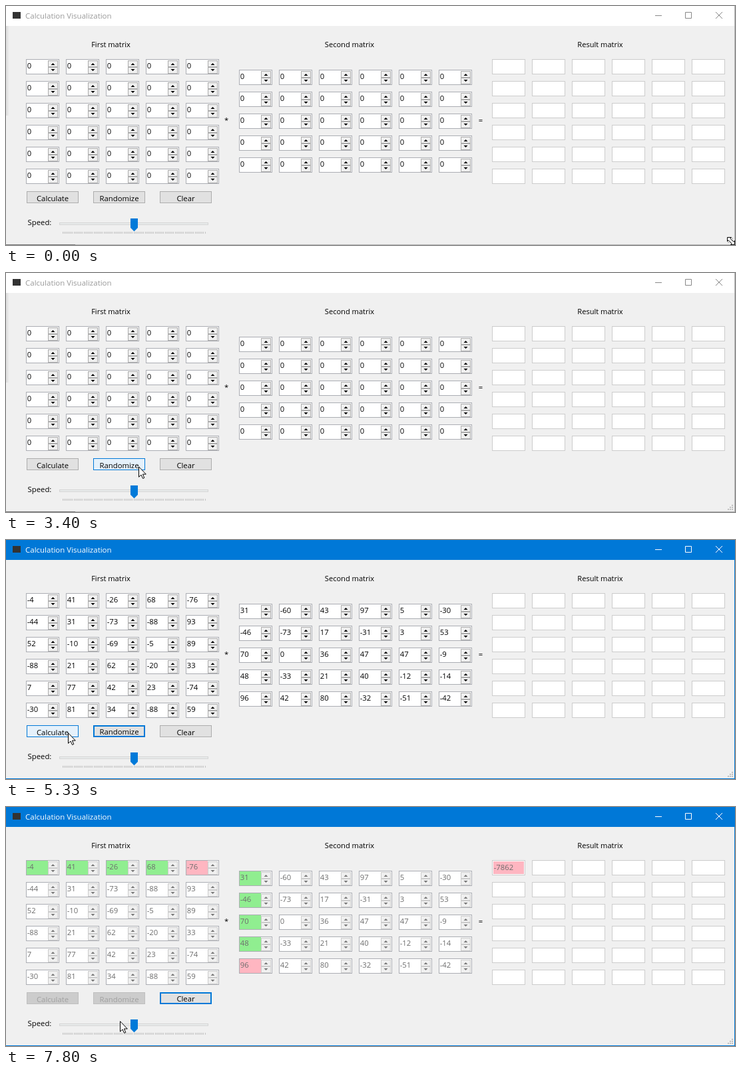
An HTML page that plays this animation: 1095 by 360 pixels, repeating every 8000 ms.

```html
<!DOCTYPE html>
<html lang="en">
<head>
<meta charset="utf-8">
<title>Calculation Visualization</title>
<style>
html, body { margin: 0; width: 100%; height: 100%; overflow: hidden; background: #f0f0f0; }
svg { display: block; width: 1095px; height: 360px; font: 11.3px "Open Sans", "Noto Sans", sans-serif; }
text { white-space: pre; }
rect { shape-rendering: crispEdges; }
</style>
</head>
<body>
<svg id="stage" viewBox="0 0 1095 360">
  <defs>
    <linearGradient id="shade">
      <stop offset="0" stop-color="#000" stop-opacity=".09"/>
      <stop offset="1" stop-color="#000" stop-opacity="0"/>
    </linearGradient>
  </defs>
</svg>
<script>
const FPS = 15, FRAMES = 120;
const PINK = '#ffb6c1', GREEN = '#90ee90', BLUE = '#0078d7';

// Text of the two matrices, one line per row
const parse = str => str.trim().split('\n').map(row => row.trim().split(/\s+/));
const A = parse(`
  -4   41  -26   68  -76
  -44  31  -73  -88   93
  52  -10  -69   -5   89
  -88  21   62  -20   33
  7    77   42   23  -74
  -30  81   34  -88   59`);
const B = parse(`
  31  -60   43   97    5  -30
  -46 -73   17  -31    3   53
  70    0   36   47   47   -9
  48  -33   21   40  -12  -14
  96   42   80  -32  -51  -42`);

// Moments, counted in ticks of 1/15 s
const ACTIVE = 61, FILLED = 62, PRESS = 84, START = 86, LOCKED = 87, STEP = 7.75;

const linear = k => k;
const speedUp = k => k ** 2.4;
const slowDown = k => 1 - (1 - k) ** 1.5;

// Pointer moves: first tick, last tick, destination, easing
const MOVES = [
  [0, 25, 355, 339, speedUp],
  [26, 31, 328, 330, slowDown],
  [34, 47, 267, 312, linear],
  [47, 51, 199, 291, linear],
  [51, 55, 128, 291, linear],
  [55, 60, 165, 293, slowDown],
  [67, 70, 162, 290, slowDown],
  [73, 81, 83, 290, linear],
  [86, 99, 160, 322, slowDown],
  [101, 107, 171, 322, linear]];

function pointer(n) {
  let x = 1089, y = 347;
  for (const [from, to, x1, y1, ease] of MOVES) {
    const k = ease(Math.min(1, Math.max(0, (n - from) / (to - from))));
    x += (x1 - x) * k;
    y += (y1 - y) * k;
  }
  return [Math.round(x), Math.round(y)];
}

const stage = document.getElementById('stage');

function set(el, attrs) {
  for (const k in attrs) el.setAttribute(k, attrs[k]);
}
function add(tag, attrs) {
  const el = document.createElementNS('http://www.w3.org/2000/svg', tag);
  set(el, attrs);
  return stage.appendChild(el);
}
function box(x, y, width, height, fill) {
  return add('rect', { x, y, width, height, fill });
}
function frame(x, y, w, h, fill, stroke) {
  return add('rect', { x: x + .5, y: y + .5, width: w - 1, height: h - 1, fill, stroke });
}
function label(x, y, str, attrs = {}) {
  const el = add('text', { x, y, ...attrs });
  el.textContent = str;
  return el;
}

// Window
const shade = box(0, 30, 5, 135, 'url(#shade)');
const bar = box(0, 0, 1095, 30, '#fff');
box(10, 9, 12, 10, '#333');
const title = label(29, 19, 'Calculation Visualization', { 'font-size': 11.5 });
const caption = add('path', {
  d: 'M975 14.5h10M1020.5 9.5h9v9h-9zM1066 9l10 10M1076 9l-10 10', fill: 'none' });
const edge = add('path', { d: 'M0 359.5H1094.5V0', fill: 'none', 'shape-rendering': 'crispEdges' });
const strip = box(0, 359, 104, 1, '#777');
for (let i = 0; i < 3; i++)
  for (let j = 0; i + j < 3; j++) box(1090 - 3 * i, 355 - 3 * j, 2, 2, '#bfbfbf');

['First', 'Second', 'Result'].forEach((name, i) =>
  label([157.5, 516, 892.5][i], 62, name + ' matrix', { 'font-size': 11.1, 'text-anchor': 'middle' }));
label(328, 176, '*');
label(709.7, 176, '=');

// Number fields
function spinner(x, y) {
  frame(x, y, 50, 23, '#fff', '#abadb3');
  const back = box(x + 1, y + 1, 32, 21, '#fff');
  const keys = [2, 12].map(dy => frame(x + 33, y + dy, 15, 10, '#f0f0f0', '#acacac'));
  const arrows = add('path', {
    d: `M${x + 37.5} ${y + 9}h6l-3 -3zM${x + 37.5} ${y + 15}h6l-3 3z` });
  const text = label(x + 1.7, y + 14, '0');
  return { back, keys, arrows, text };
}
function grid(rows, cols, x, y, make) {
  return Array.from({ length: rows }, (_, r) =>
    Array.from({ length: cols }, (_, c) => make(x + 60 * c, y + 33 * r)));
}
const first = grid(6, 5, 30, 80, spinner);
const second = grid(5, 6, 350, 96, spinner);
grid(6, 6, 730, 80, (x, y) => frame(x, y, 50, 23, '#fff', '#ccc'));
const sumBack = box(732, 82, 46, 19, PINK);
const sumText = label(732.7, 95, '', { fill: '#6d6d6d' });

// Buttons
const buttons = ['Calculate', 'Randomize', 'Clear'].map((name, i) => {
  const x = 31 + 100 * i;
  return {
    x,
    face: box(x, 279, 78, 18, '#e1e1e1'),
    rim: add('rect', { fill: 'none' }),
    text: label(x + 39, 294, name, { 'text-anchor': 'middle' })
  };
});

// Speed slider
label(32.6, 330, 'Speed:');
frame(80, 326, 224, 4, '#e7eaea', '#d6d6d6');
for (let i = 0; i <= 100; i++) box(85 + Math.floor(i * 2.14), 340, 1, 3, '#c4c4c4');
add('path', { d: 'M187 320H198V334L192.5 339.5L187 334Z', fill: '#007ad9' });

// Pointers
const ink = { fill: '#fff', stroke: '#000' };
const resizer = add('path', { ...ink, transform: 'translate(1083.5 348.5)',
  d: 'M0 0H6L4.3 1.7L9.3 6.7L11 5V11H5L6.7 9.3L1.7 4.3L0 6Z' });
const arrow = add('path', { ...ink,
  d: 'M.5 .8V16.3L4 13L6.6 18.5L8.8 17.5L6.4 12.1H11.3Z' });

function paintCell(cell, value, color, dim, locked) {
  cell.text.textContent = value;
  set(cell.text, { fill: dim ? '#6d6d6d' : '#000' });
  set(cell.back, { fill: color });
  set(cell.arrows, { fill: locked ? '#777' : '#000' });
  for (const k of cell.keys) set(k, { stroke: locked ? '#ccc' : '#acacac' });
}

function paintButton(b, { off, hover, down, focus, fading }) {
  const [face, rim] =
    fading ? ['#e5f1fb', BLUE] :
    off ? ['#ccc', '#bfbfbf'] :
    down ? ['#cce4f7', '#005499'] :
    hover ? ['#e5f1fb', BLUE] : ['#e1e1e1', focus ? BLUE : '#adadad'];
  const w = focus && !hover && !down ? 2 : 1;
  set(b.face, { fill: face });
  set(b.rim, { x: b.x + w / 2, y: 279 + w / 2, width: 78 - w, height: 18 - w, stroke: rim, 'stroke-width': w });
  set(b.text, { y: focus ? 293 : 294, fill: off ? '#a0a0a0' : '#000' });
}

function render(n) {
  const active = n >= ACTIVE, filled = n >= FILLED, locked = n >= START, all = n >= LOCKED;
  const step = Math.floor((n + .5 - START) / STEP);
  const mark = k => step < 0 ? '#fff' : k === step ? PINK : GREEN;

  set(bar, { fill: active ? BLUE : '#fff' });
  set(title, { fill: active ? '#fff' : '#999' });
  set(caption, { stroke: active ? '#fff' : '#888' });
  set(edge, { stroke: active ? BLUE : '#b4b4b4' });
  for (const el of [shade, strip]) set(el, { opacity: active ? 0 : 1 });

  // While locking, the first 22 fields have already been repainted
  first.forEach((row, r) => row.forEach((cell, c) =>
    paintCell(cell, filled ? A[r][c] : 0, r ? '#fff' : mark(c), all || locked && r * 5 + c < 22, locked)));
  second.forEach((row, r) => row.forEach((cell, c) =>
    paintCell(cell, filled ? B[r][c] : 0, c || !all ? '#fff' : mark(r), all, locked)));

  let sum = 0;
  for (let k = 0; k <= step; k++) sum += A[0][k] * B[k][0];
  sumText.textContent = all ? sum : '';
  set(sumBack, { opacity: all ? 1 : 0 });

  const [x, y] = pointer(n);
  const focused = all ? 2 : n >= PRESS ? 0 : active ? 1 : -1;
  const pressed = n === ACTIVE ? 1 : n === PRESS ? 0 : -1;
  buttons.forEach((b, i) => {
    const off = locked && i < 2;
    paintButton(b, {
      off,
      hover: x >= b.x && x < b.x + 78 && y >= 279 && y < 297,
      down: i === pressed,
      focus: i === focused && !off,
      fading: off && !all && i === 0
    });
  });

  set(resizer, { opacity: n ? 0 : 1 });
  set(arrow, { opacity: n ? 1 : 0, transform: `translate(${x} ${y})` });
}

const origin = performance.now();
let last = -1;
function tick() {
  const n = Math.floor((performance.now() - origin) * FPS / 1000 + .1) % FRAMES;
  if (n !== last) render(last = n);
  requestAnimationFrame(tick);
}
tick();
</script>
</body>
</html>
```
